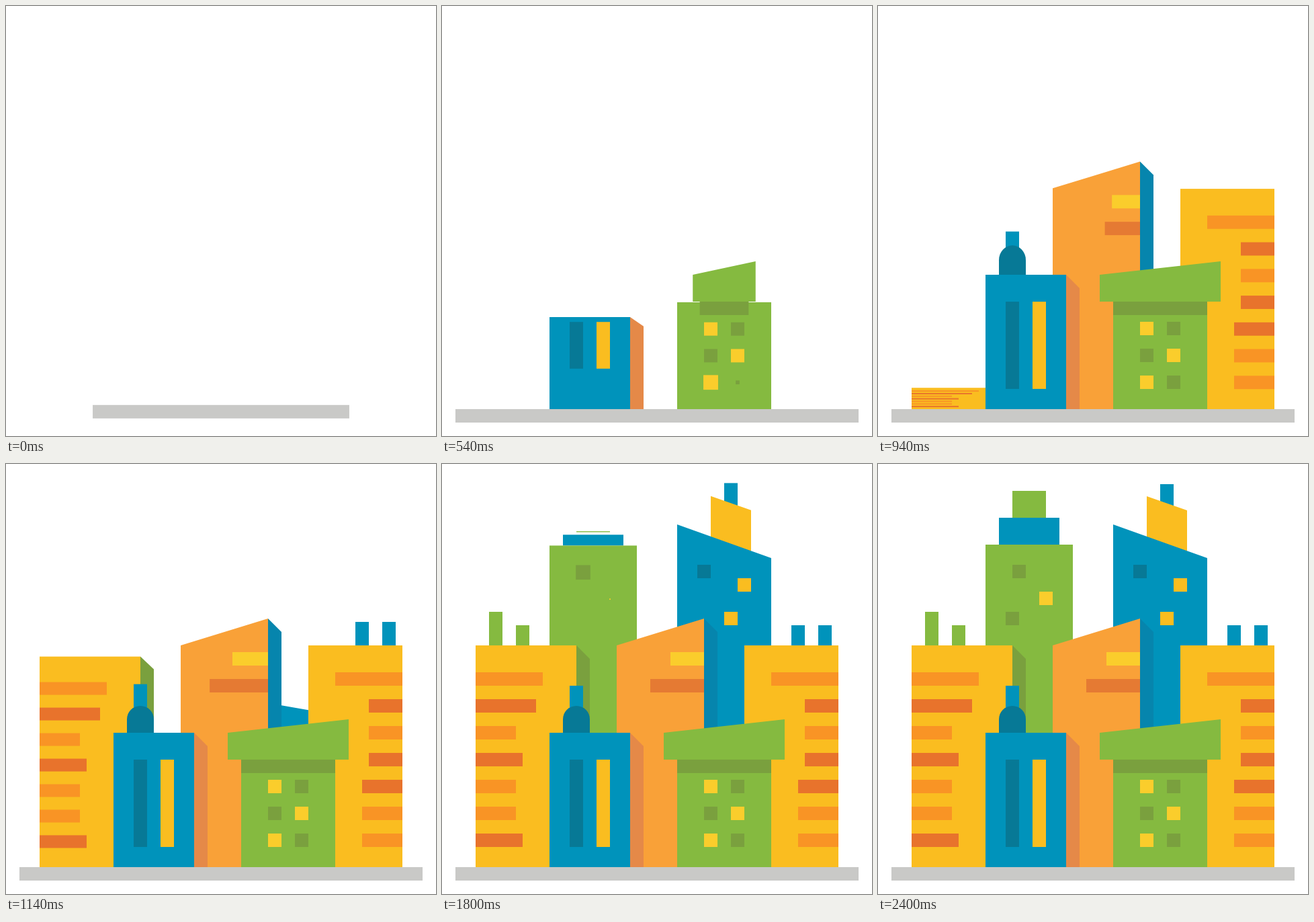
An HTML page that plays this animation: 640 by 640 pixels, repeating every 9.88 s.

```html
<!DOCTYPE html>
<html lang="en">
<head>
<meta charset="utf-8">
<title>City</title>
<style>
  html, body { margin: 0; width: 100%; height: 100%; overflow: hidden; background: #fff; }
  svg { display: block; width: 100%; height: 100%; }
</style>
</head>
<body>
<svg id="city" viewBox="0 0 640 640"></svg>
<script>
const LOOP = 9880;
const GREEN = '#85ba40', MOSS = '#7aa03e', YELLOW = '#fabd20', LEMON = '#facd2c',
      BLUE = '#0093bb', NAVY = '#077996', FACE = '#0685ad', ORANGE = '#f9a138',
      AMBER = '#f99425', RUST = '#e8732c', BRICK = '#e57a33', SHADE = '#e58948', GREY = '#c9c9c7';

const expoOut = u => u >= 1 ? 1 : 1 - 2 ** (-10 * u);
const backOut = u => 1 + 2.70158 * (u - 1) ** 3 + 1.70158 * (u - 1) ** 2;

const parts = [];
const rect = (x, y, w, h, fill) => `<rect x="${x}" y="${y}" width="${w}" height="${h}" fill="${fill}"/>`;
const poly = (points, fill) => `<polygon points="${points}" fill="${fill}"/>`;

// Group scaled from (ox, oy) along the given axes
function part(start, dur, ease, ox, oy, axes, content, lift = 0) {
  parts.push({ start, dur, ease, ox, oy, axes, lift });
  return `<g id="p${parts.length - 1}">${content}</g>`;
}
const rise = (start, base, content) => part(start, 480, expoOut, 0, base, 'y', content);
const spring = (start, base, content) => part(start, 405, backOut, 0, base, 'y', content);
const widen = (start, dur, ox, content) => part(start, dur, backOut, ox, 0, 'x', content);

// Square windows popping one after another
const panes = (start, list) => list.map(([x, y, fill], i) =>
  part(start + i * 70, 150, backOut, x + 10, y + 10, 'xy', rect(x, y, 20, 20, fill))).join('');

const slats = (ends, rusty, edge) => ends.map((end, i) =>
  rect(Math.min(end, edge), 310 + i * 40, Math.abs(end - edge), 20, rusty.includes(i) ? RUST : AMBER)).join('');

const greenTower = rise(1396, 600,
  spring(1798, 100, rect(200, 40, 50, 60, GREEN)) +
  spring(1760, 120, rect(180, 80, 90, 40, BLUE)) +
  rect(160, 120, 130, 480, GREEN) +
  panes(1727, [[200, 150, MOSS], [240, 190, LEMON], [190, 220, MOSS]]));

const blueTower = rise(1093, 600,
  spring(1468, 71, rect(420, 30, 20, 41, BLUE)) +
  spring(1408, 150, poly('400,48 460,69 460,150 400,150', YELLOW)) +
  poly('350,90 490,140 490,600 350,600', BLUE) +
  panes(1217, [[420, 220, YELLOW], [440, 170, YELLOW], [380, 150, NAVY]]));

const leftBlock = rise(933, 600,
  spring(1238, 270, rect(70, 220, 20, 50, GREEN) + rect(110, 240, 20, 30, GREEN)) +
  poly('200,270 220,290 220,600 200,600', MOSS) +
  rect(50, 270, 150, 330, YELLOW) +
  slats([150, 140, 110, 120, 110, 110, 120], [1, 3, 6], 50));

const rightBlock = rise(590, 600,
  spring(908, 290, rect(520, 240, 20, 50, BLUE) + rect(560, 240, 20, 50, BLUE)) +
  rect(450, 270, 140, 330, YELLOW) +
  slats([490, 540, 540, 540, 530, 530, 530], [1, 3, 4], 590));

const orangeBlock = rise(560, 600,
  poly('390,230 410,250 410,600 390,600', FACE) +
  poly('260,270 390,230 390,600 260,600', ORANGE) +
  widen(836, 400, 390, rect(340, 280, 50, 20, LEMON)) +
  widen(868, 400, 390, rect(310, 320, 80, 20, BRICK)));

const blueHouse = rise(460, 600,
  spring(830, 370, rect(190, 330, 20, 40, BLUE)) +
  spring(677, 400, `<path d="M180 401V380a20 20 0 0 1 40 0v21z" fill="${NAVY}"/>`) +
  poly('280,400 300,420 300,600 280,600', SHADE) +
  rect(160, 400, 120, 200, BLUE)) +
  rise(487, 505, rect(190, 440, 20, 130, NAVY) + rect(230, 440, 20, 130, YELLOW));

const greenHouse = rise(184, 600,
  rect(350, 440, 140, 160, GREEN) +
  panes(180, [[390, 470, LEMON], [430, 470, MOSS], [390, 510, MOSS],
              [430, 510, LEMON], [390, 550, LEMON], [430, 550, MOSS]])) +
  widen(500, 300, 420, rect(350, 440, 140, 20, MOSS)) +
  widen(500, 300, 420, poly('330,400 510,380 510,440 330,440', GREEN));

const ground = part(-70, 404, backOut, 320, 0, 'x', rect(20, 600, 600, 20, GREY), 17);

document.getElementById('city').innerHTML =
  greenTower + blueTower + leftBlock + rightBlock + orangeBlock + blueHouse + greenHouse + ground;
parts.forEach((p, i) => p.node = document.getElementById('p' + i));

function draw(t) {
  for (const p of parts) {
    const u = Math.min(1, (t - p.start) / p.dur);
    p.node.style.display = u > 0 ? '' : 'none';
    if (u <= 0) continue;
    const s = p.ease(u);
    const sx = p.axes.includes('x') ? s : 1, sy = p.axes.includes('y') ? s : 1;
    p.node.setAttribute('transform',
      `translate(${p.ox * (1 - sx)} ${p.oy * (1 - sy) + p.lift * (s - 1)}) scale(${sx} ${sy})`);
  }
}

let origin;
function tick(now) {
  origin ??= now;
  draw((now - origin) % LOOP);
  requestAnimationFrame(tick);
}
draw(0);
requestAnimationFrame(tick);
</script>
</body>
</html>
```
